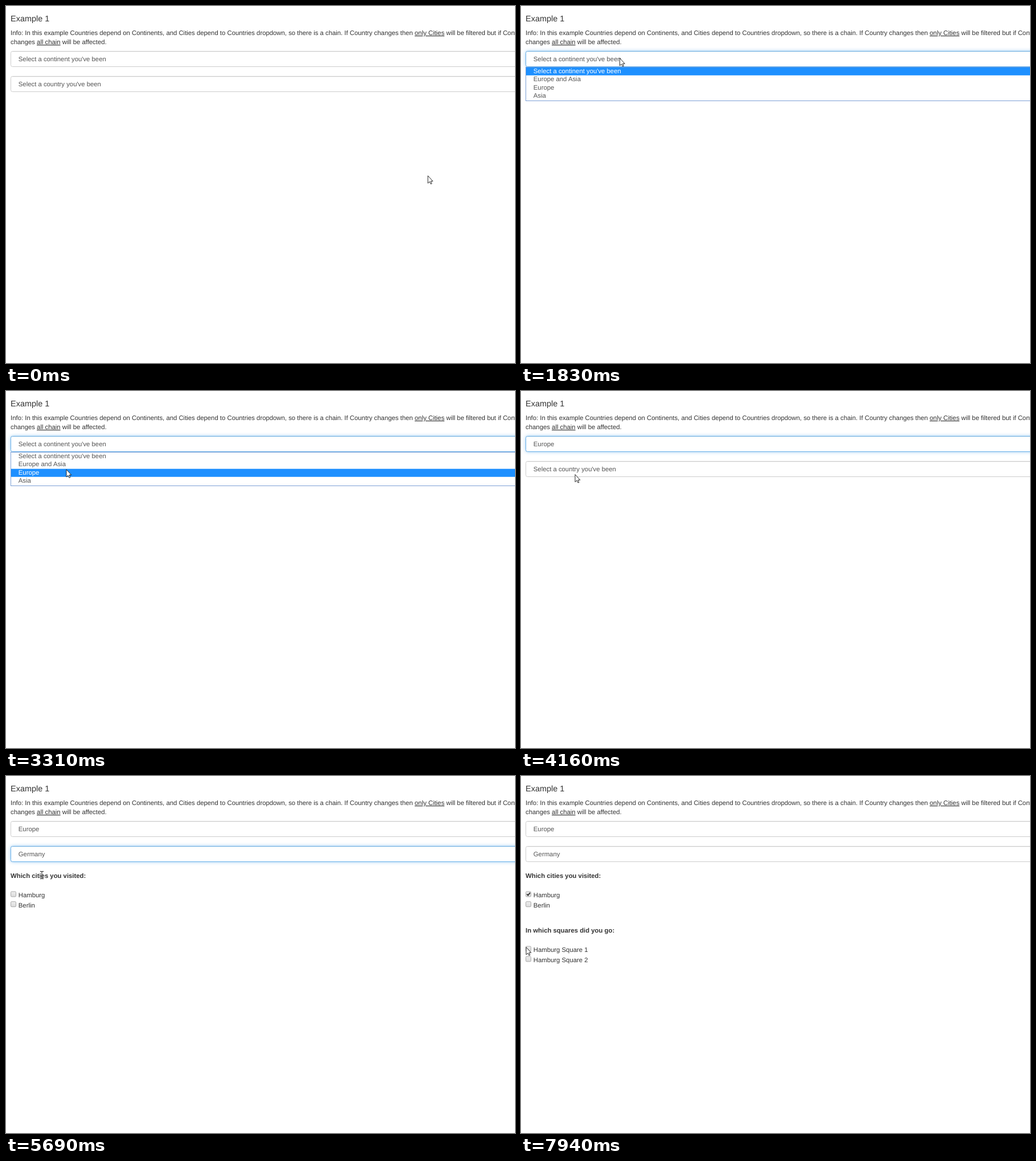
Write an HTML page that moves like this. It is 894 px wide and 627 px high and loops after 8 s.

```html
<!DOCTYPE html>
<html lang="en">
<head>
<meta charset="utf-8">
<title>Chained dropdowns</title>
<style>
  html, body { margin: 0; width: 100%; height: 100%; overflow: hidden; background: #fff; }
  svg { display: block; }
  text {
    font: 11.34px "Liberation Sans", Arial, sans-serif;
    fill: #333;
    text-rendering: geometricPrecision;
    white-space: pre;
  }
  .title { font-size: 14.45px; }
  .bold { font-weight: bold; }
  .field, .item { fill: #555; }
  .on { fill: #fff; }
  .u { text-decoration: underline; }
  .glow { filter: drop-shadow(0 0 3.2px rgba(102, 175, 233, .6)); }
</style>
</head>
<body>
<svg id="stage" width="894" height="627" viewBox="0 0 894 627">
  <defs>
    <linearGradient id="box" x2="0" y2="1">
      <stop stop-color="#eee"/><stop offset="1" stop-color="#dadada"/>
    </linearGradient>
  </defs>
</svg>
<script>
const LOOP = 8000, STEP = 76, ROW = 14.5;
const CONTINENT = "Select a continent you've been";
const COUNTRY = "Select a country you've been";

// When each thing happens
const OPEN1 = 1740, PICK1 = 4100, OPEN2 = 4460, PICK2 = 5390, LEAVE = 6260, TICK = 6950;

// Pointer moves: start, end and where it comes to rest
const home = { x: 740.5, y: 297.5 };
const moves = [
  [440, 670, 365, 164], [820, 820, 364, 163], [970, 1360, 180, 85],
  [1430, 1590, 173, 91], [2220, 2830, 140, 119], [2910, 3080, 108, 134],
  [3310, 3530, 98, 147], [4100, 4310, 84, 143], [4460, 4770, 74, 151],
  [4850, 5160, 64, 171], [5240, 5690, 63, 174], [LEAVE, 6330, 25, 213],
  [6560, 7100, 16, 209], [7250, 7940, 8.5, 300]
];

const text = (x, y, s, cls = "") => `<text x="${x}" y="${y}" class="${cls}">${s}</text>`;
const under = s => `<tspan class="u">${s}</tspan>`;
const group = (id, body) => `<g id="${id}">${body}</g>`;
const frame = (y, h, color, more = "") =>
  `<rect x="8.5" y="${y + .5}" width="920" height="${h - 1}" fill="#fff" stroke="${color}" ${more}/>`;

const field = (id, y, label) => group(id,
  frame(y, 28, "#ccc", 'rx="3"') +
  `<g class="halo">${frame(y, 28, "#66afe9", 'rx="3" class="glow"')}</g>` +
  `<path d="M11 ${y + 1.5}H894" stroke="#000" stroke-opacity=".06"/>` +
  text(21.8, y + 18, label, "field"));

const rowTop = (top, i) => top + .7 + ROW * i;

const popup = (id, top, bottom, rows) => group(id,
  frame(top, bottom - top, "#7b9fd6") +
  `<rect class="bar" x="9" width="900" height="${ROW - .4}" fill="#1e90ff"/>` +
  rows.map((s, i) => text(21.8, Math.floor(rowTop(top, i) + 10.4), s, "item")).join(""));

const check = (y, label) =>
  `<rect x="8.5" y="${y - 4.5}" width="9" height="9" rx="1.5" fill="url(#box)" stroke="#ababab"/>` +
  text(21.8, y + 5.4, label);

const stage = document.getElementById("stage");
stage.insertAdjacentHTML("beforeend",
  text(8.1, 27.4, "Example 1", "title") +
  text(8.1, 51, "Info: In this example Countries depend on Continents, and Cities depend to " +
    "Countries dropdown, so there is a chain. If Country changes then " + under("only Cities") +
    " will be filtered but if Continent") +
  text(8.1, 67, "changes " + under("all chain") + " will be affected.") +
  field("field1", 79, CONTINENT) +
  field("field2", 123, COUNTRY) +
  group("cities", text(8.1, 178.8, "Which cities you visited:", "bold") +
    check(207.5, "Hamburg") + check(225.2, "Berlin")) +
  group("squares",
    '<path d="M10.3 207.4L12.3 209.6 16 204.8" fill="none" stroke="#333" stroke-width="1.9"/>' +
    text(8.1, 275, "In which squares did you go:", "bold") +
    check(303.6, "Hamburg Square 1") + check(321.4, "Hamburg Square 2")) +
  popup("popup1", 107, 167, [CONTINENT, "Europe and Asia", "Europe", "Asia"]) +
  popup("popup2", 151, 210, [COUNTRY, "Germany", "Kosovo", "Turkey"]) +
  group("pointer",
    '<path id="arrow" d="M.5 .6V13.8L3.5 11 5.5 15.2 7.4 14.4 5.5 10.3H9.3Z" fill="#fff" stroke="#111" stroke-width=".9"/>' +
    '<path id="beam" d="M-3 -6.5H-.8L0 -5.8 .8 -6.5H3M0 -6V6M-3 6.5H-.8L0 5.8 .8 6.5H3" fill="none" stroke="#111"/>'));

const el = id => document.getElementById(id);
const show = (id, on) => { el(id).style.display = on ? "" : "none"; };
const clamp = (v, lo, hi) => Math.max(lo, Math.min(hi, v));
const within = (t, a, b) => t >= a && t < b;

// The pointer advances in even jumps about one STEP apart
function pointerAt(t) {
  let { x, y } = home;
  for (const [a, b, u, v] of moves) {
    if (t < a) break;
    const gaps = Math.round((b - a) / STEP);
    const done = t >= b ? gaps : Math.floor((t - a) / (b - a) * gaps + .05);
    const f = (done + 1) / (gaps + 1);
    x += (u - x) * f;
    y += (v - y) * f;
  }
  return { x, y };
}

// Focus ring comes and goes in two half steps
const fade = (t, at) => clamp(Math.floor((t - at) / 80) + 1, 0, 2) / 2;

function setField(id, label, glow) {
  const f = el(id);
  f.querySelector("text").textContent = label;
  f.querySelector(".halo").style.opacity = glow;
}

// The row under the pointer is highlighted
function setPopup(id, top, open, y) {
  show(id, open);
  const row = clamp(Math.floor((y - rowTop(top, 0)) / ROW), 0, 3);
  el(id).querySelector(".bar").setAttribute("y", rowTop(top, row));
  el(id).querySelectorAll("text").forEach((n, i) => n.classList.toggle("on", i === row));
}

function draw(t) {
  const { x, y } = pointerAt(t);
  setField("field1", t < PICK1 ? CONTINENT : "Europe", fade(t, OPEN1) - fade(t, OPEN2));
  setField("field2", t < PICK2 ? COUNTRY : "Germany", fade(t, OPEN2) - fade(t, TICK));
  setPopup("popup1", 107, within(t, OPEN1, PICK1), y);
  setPopup("popup2", 151, within(t, OPEN2, PICK2), y);
  show("cities", t >= PICK2);
  show("squares", t >= TICK);
  const beam = within(t, PICK2, LEAVE);
  show("beam", beam);
  show("arrow", !beam);
  el("pointer").setAttribute("transform", `translate(${x} ${y})`);
}

const start = performance.now();
function tick() {
  draw((performance.now() - start) % LOOP);
  requestAnimationFrame(tick);
}
draw(0);
requestAnimationFrame(tick);
</script>
</body>
</html>
```
